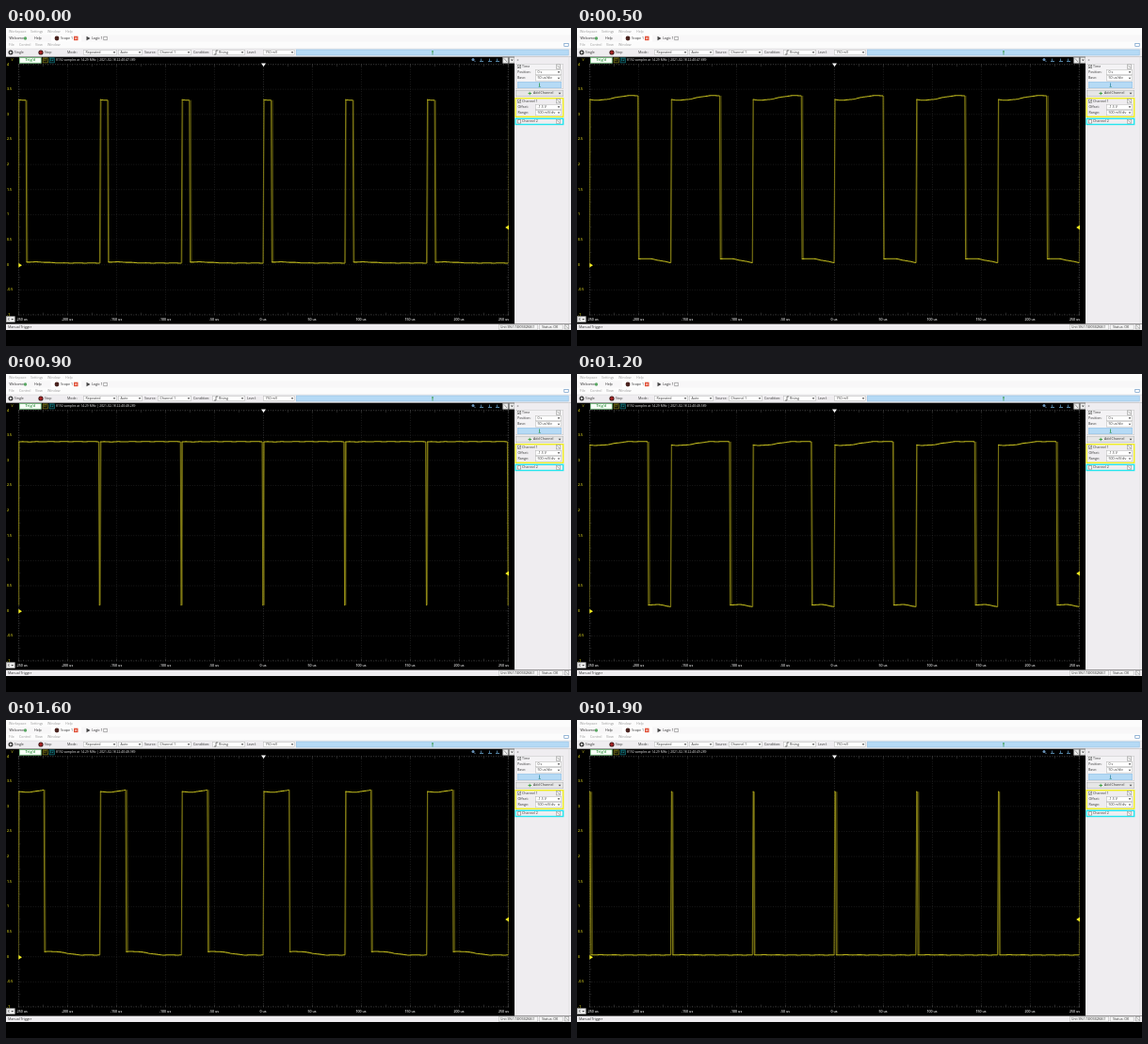
An HTML page with a canvas that plays this animation: 600 by 338 pixels, repeating every 2 s.

```html
<!DOCTYPE html>
<html lang="en">
<head>
<meta charset="utf-8">
<title>Oscilloscope</title>
<style>
html, body { margin: 0; width: 100%; height: 100%; overflow: hidden; background: #000; }
canvas { display: block; width: 600px; height: 338px; }
</style>
</head>
<body>
<canvas id="stage"></canvas>
<script>
const canvas = document.getElementById('stage');
const scale = window.devicePixelRatio || 1;
canvas.width = 600 * scale;
canvas.height = 338 * scale;
const ctx = canvas.getContext('2d');
ctx.scale(scale, scale);

const LEFT = 13, RIGHT = 534, TOP = 38.5, BOTTOM = 305;
const CENTER = 273.5, DIV_X = 52, DIV_Y = 26.65;
const PERIOD = 86.8, STEP_MS = 100, STEPS = 20;
const PANEL = '#efedf0';

function rect(x, y, w, h, fill, stroke) {
  if (fill) { ctx.fillStyle = fill; ctx.fillRect(x, y, w, h); }
  if (stroke) {
    ctx.strokeStyle = stroke;
    ctx.lineWidth = 0.6;
    ctx.strokeRect(x + 0.3, y + 0.3, w - 0.6, h - 0.6);
  }
}

function text(str, x, y, color = '#333', size = 3.6, align = 'left', weight = 400) {
  ctx.font = `${weight} ${size}px "Open Sans", "Noto Sans", sans-serif`;
  ctx.textAlign = align;
  ctx.textBaseline = 'middle';
  ctx.fillStyle = color;
  ctx.fillText(str, x, y);
}

function shape(points, fill) {
  ctx.beginPath();
  points.forEach(([x, y]) => ctx.lineTo(x, y));
  ctx.fillStyle = fill;
  ctx.fill();
}

function dot(x, y, r, fill) {
  ctx.beginPath();
  ctx.arc(x, y, r, 0, Math.PI * 2);
  ctx.fillStyle = fill;
  ctx.fill();
}

function line(x1, y1, x2, y2, color, width = 0.6) {
  ctx.beginPath();
  ctx.moveTo(x1, y1);
  ctx.lineTo(x2, y2);
  ctx.strokeStyle = color;
  ctx.lineWidth = width;
  ctx.stroke();
}

function frame(x, y, w, h, color) {
  rect(x, y, w, h, PANEL);
  ctx.strokeStyle = color;
  ctx.lineWidth = 1.4;
  ctx.strokeRect(x + 0.7, y + 0.7, w - 1.4, h - 1.4);
}

function arrowDown(x, y) {
  shape([[x - 1.3, y - 0.7], [x + 1.3, y - 0.7], [x, y + 0.9]], '#444');
}

function combo(x, y, w, label, indent = 2.5) {
  rect(x, y - 3, w, 6, '#fff', '#bbb');
  text(label, x + indent, y);
  arrowDown(x + w - 3, y);
}

function gearBox(x, y) {
  rect(x - 2.5, y - 2.5, 5, 5, '#f4f4f4', '#999');
  line(x - 1, y - 1.2, x + 1.2, y + 1.2, '#777');
}

function checkbox(x, y, checked) {
  rect(x - 2, y - 2, 4, 4, '#fff', '#777');
  if (checked) {
    line(x - 1, y, x - 0.2, y + 1, '#444');
    line(x - 0.2, y + 1, x + 1.2, y - 1.2, '#444');
  }
}

function drawMenus() {
  rect(0, 0, 600, 30.4, '#fcfcfc');
  [['Workspace', 3], ['Settings', 26], ['Window', 44], ['Help', 63]]
    .forEach(([label, x]) => text(label, x, 3.6, '#999'));

  rect(0, 7.5, 600, 7, '#f8f7f8');
  rect(48, 7.5, 32, 7, '#fff');
  text('Welcome', 3.5, 11.2, '#222');
  dot(20.5, 11, 1.7, '#5aa864');
  text('Help', 30, 11.2, '#222');
  dot(54, 11, 2.4, '#4a2420');
  text('Scope 1', 58, 11.2, '#222');
  rect(72, 8.7, 4.5, 4.5, '#e05038');
  line(73.2, 9.9, 75.3, 12, '#fff');
  line(75.3, 9.9, 73.2, 12, '#fff');
  shape([[85.5, 8.7], [89.5, 11], [85.5, 13.3]], '#444');
  text('Logic 1', 91, 11.2, '#222');
  rect(103.5, 8.9, 4, 4.2, '#fff', '#777');

  [['File', 3], ['Control', 14], ['View', 31], ['Window', 44]]
    .forEach(([label, x]) => text(label, x, 18.4, '#999'));
  rect(592.5, 16, 5, 4, '#fff', '#5588bb');
}

function drawToolbar() {
  rect(0, 22, 600, 8.4, PANEL);
  line(0, 22, 600, 22, '#ccc', 0.4);
  dot(5, 26, 2.5, '#333');
  shape([[4.2, 24.6], [6.7, 26], [4.2, 27.4]], '#eee');
  text('Single', 8.8, 26.2);
  dot(37, 26, 2.6, '#3a1818');
  dot(37, 26, 1.7, '#a82424');
  text('Stop', 40.8, 26.2);
  text('Mode:', 65, 26);
  combo(82, 26, 36, 'Repeated');
  combo(119, 26, 26, 'Auto');
  text('Source:', 147, 26);
  combo(161, 26, 36, 'Channel 1');
  text('Condition:', 199, 26);
  combo(219, 26, 35, 'Rising', 7);
  line(221, 28, 223, 28, '#333');
  line(223, 28, 223, 24, '#333');
  line(223, 24, 225, 24, '#333');
  text('Level:', 256, 26);
  combo(273, 26, 34, '750 mV');
  rect(308, 22.8, 289.5, 6.4, '#b5daf5', '#9cc4e4');
  line(453, 24, 453, 28.5, '#3a9a50', 0.8);
  line(452, 25, 454, 25, '#3a9a50', 0.8);
}

function drawSidePanel(step) {
  rect(540, 30.4, 60, 284, PANEL);
  line(597.8, 30, 597.8, 314, '#ddd', 0.5);
  text('«', 542.5, 33.8, '#333', 4);

  rect(541, 38, 51, 27, '#f4f3f5', '#ccc');
  checkbox(545, 41, true);
  text('Time', 548, 41.2);
  gearBox(586.5, 41);
  text('Position:', 543, 47);
  combo(562, 47, 28, '0 s');
  text('Base:', 543, 53.4);
  combo(562, 53.4, 28, '50 us/div');
  rect(543, 57, 47, 7, '#b5daf5', '#9cc4e4');
  line(566.5, 58.5, 566.5, 62.5, step % 3 ? '#3388aa' : '#2f9a50', 0.8);
  line(565.5, 62.5, 568, 62.5, '#4a9a80');

  rect(541, 66, 51, 7, '#e6e6e6', '#bbb');
  line(554.5, 69.5, 558, 69.5, '#3aa040', 0.9);
  line(556.2, 67.8, 556.2, 71.2, '#3aa040', 0.9);
  text('Add Channel', 560, 69.5);
  arrowDown(588, 69.5);

  frame(540.4, 74, 52, 21, '#f0ee20');
  checkbox(545, 77.7, true);
  text('Channel 1', 548, 77.8);
  gearBox(586.5, 77.7);
  text('Offset:', 543.5, 84);
  combo(562, 84, 28, '-1.5 V');
  text('Range:', 543.5, 90.2);
  combo(562, 90.2, 28, '500 mV/div');

  frame(540.4, 95.6, 52, 7.6, '#25e5ee');
  checkbox(545, 99.4, false);
  text('Channel 2', 548, 99.5);
  gearBox(586.5, 99.4);
}

function drawStatusBar() {
  rect(0, 314.6, 600, 6.4, PANEL);
  text('Manual Trigger', 2, 317.9);
  rect(523, 315, 42, 5.6, '#f5f5f5', '#bbb');
  text('Unit SN:174905B28461', 525, 317.9, '#333', 3.4);
  rect(566, 315, 25.5, 5.6, '#f5f5f5', '#bbb');
  text('Status: OK', 569, 317.9);
  gearBox(595.5, 317.8);
}

function drawScopeHeader(step) {
  const seconds = (47.389 + step * 0.1).toFixed(3);
  text('V', 5.5, 34.2, '#d8d020', 3.5);
  rect(14, 31.3, 23.5, 6.2, '#f6fff6', '#4fae5c');
  text("Trig'd", 25.7, 34.4, '#2b8c3a', 4, 'center', 600);
  rect(38.8, 31.6, 5.8, 5.6, '#16160a', '#8c881c');
  text('C1', 41.7, 34.4, '#d8d020', 3.3, 'center');
  rect(45.8, 31.6, 5.8, 5.6, '#06181a', '#168088');
  text('C2', 48.7, 34.4, '#25d5df', 3.3, 'center');
  text(`8192 samples at 14.29 MHz | 2021-02-18 22:40:${seconds}`, 53, 34.3, '#eee', 3.35);

  dot(496, 33.5, 1.5, '#6a93b8');
  line(497, 34.5, 498.5, 36, '#6a93b8', 0.8);
  for (const x of [505, 514, 522]) {
    line(x - 2, 35.5, x + 2, 35.5, '#5d91b5', 0.9);
    line(x - 0.5, 32.5, x - 0.5, 35, '#5d91b5', 0.8);
  }
  rect(527.5, 31, 6, 6.5, '#eee', '#888');
  line(529, 32.5, 532, 36, '#666');
  rect(534.3, 31, 6, 6.5, '#eee', '#888');
  arrowDown(537.3, 34.3);
}

function drawGrid() {
  ctx.setLineDash([1, 1.6]);
  for (let i = 0; i <= 10; i++) {
    const x = LEFT + 0.4 + i * DIV_X, y = TOP + i * DIV_Y;
    const border = i % 10 === 0;
    line(x, TOP, x, BOTTOM, border || i === 5 ? '#555' : '#333', 0.6);
    line(LEFT, y, RIGHT, y, border ? '#555' : '#2e2e2e', 0.6);
  }
  ctx.setLineDash([]);
  for (let i = 0; i <= 100; i++) {
    const size = i % 5 ? 1.2 : 2.4;
    const x = LEFT + 0.4 + i * DIV_X / 10, y = TOP + i * DIV_Y / 10;
    line(x, TOP, x, TOP + size, '#555', 0.5);
    line(x, BOTTOM - size, x, BOTTOM, '#555', 0.5);
    line(LEFT, y, LEFT + size, y, '#444', 0.5);
    line(RIGHT - size, y, RIGHT, y, '#444', 0.5);
  }
  for (let i = 0; i <= 10; i++) {
    text(String(4 - i / 2), 1, TOP + i * DIV_Y + (i ? 0 : 1), '#d8d020', 3.6, 'left', 600);
    const label = `${i * 50 - 250} us`;
    const [x, align] = i === 0 ? [10.5, 'left']
      : i === 10 ? [RIGHT, 'right'] : [LEFT + i * DIV_X, 'center'];
    text(label, x, 309.7, '#e4e4e4', 3.6, align, 600);
  }
  rect(0, 306.5, 9.5, 6.2, '#eee', '#888');
  text('X', 1.8, 309.7, '#222');
  arrowDown(6.7, 309.7);
}

// Pulse width in pixels: widens for ten steps, then narrows again.
function pulseWidth(step) {
  const w = step < 10 ? 8 + 8.7 * step : 79.4 - 8.72 * (step - 10);
  return Math.min(PERIOD - 1.5, Math.max(0.7, w));
}

// Slow settling after an edge: full at first, gone after about 45 px.
function settle(x) {
  const t = Math.min(1, Math.max(0, (x - 8) / 37));
  const start = 1 - 0.15 * Math.exp(-x / 4);
  return start * (1 - t * t * (3 - 2 * t));
}

function drawTrace(step) {
  const width = pulseWidth(step);
  const highSag = 5 * Math.min(1, (PERIOD - width) / 30);
  const lowLift = 4.8 * Math.min(1, width / 34);
  const ripple = x => 0.15 * Math.sin(x * 0.43 + step);
  const high = x => 71.8 + highSag * settle(x) + ripple(x);
  const low = x => 249.8 - lowLift * settle(x * 1.1) + ripple(x);
  const jitter = n => 0.5 + 1.3 * Math.abs(Math.sin(n * 2.3 + step * 1.7));

  function level(from, length, curve) {
    ctx.beginPath();
    for (let x = 0; x < length; x += 1) ctx.lineTo(from + x, curve(x));
    ctx.lineTo(from + length, curve(length));
    ctx.strokeStyle = '#c0ba1e';
    ctx.lineWidth = 1.05;
    ctx.stroke();
  }

  // Overlaid acquisitions spread each slanted edge into a faint band.
  function edge(x1, y1, x2, y2, blur) {
    shape([[x1, y1], [x2, y2], [x2 + blur, y2], [x1 + blur, y1]], 'rgba(140,132,18,0.38)');
    line(x1, y1, x2, y2, '#9c951a', 0.8);
    line(x1 + blur, y1, x2 + blur, y2, '#6e6812', 0.5);
  }

  ctx.save();
  ctx.beginPath();
  ctx.rect(LEFT + 0.2, TOP, RIGHT - LEFT - 0.8, BOTTOM - TOP);
  ctx.clip();
  for (let k = -4; k <= 3; k++) {
    const rise = CENTER + k * PERIOD, fall = rise + width;
    edge(rise - 0.5, low(PERIOD - width), rise + 0.4, high(0), k ? jitter(k) * 0.5 : 0.3);
    edge(fall, high(width), fall + 0.8, low(0), jitter(k + 0.5));
    level(rise, width, high);
    level(fall + 0.5, PERIOD - width - 0.8, low);
  }
  ctx.restore();
}

function drawMarkers() {
  shape([[271, 37.5], [276, 37.5], [273.5, 41]], '#fff');
  shape([[13.3, 249.8], [17, 252.2], [13.3, 254.6]], '#f2ec20');
  shape([[534, 209.6], [530.2, 212], [534, 214.4]], '#f2ec20');
}

function render(now) {
  const step = Math.floor(now / STEP_MS) % STEPS;
  rect(0, 0, 600, 338, '#000');
  drawMenus();
  drawToolbar();
  drawScopeHeader(step);
  drawGrid();
  drawTrace(step);
  drawMarkers();
  drawSidePanel(step);
  drawStatusBar();
  requestAnimationFrame(render);
}

render(performance.now());
</script>
</body>
</html>
```
